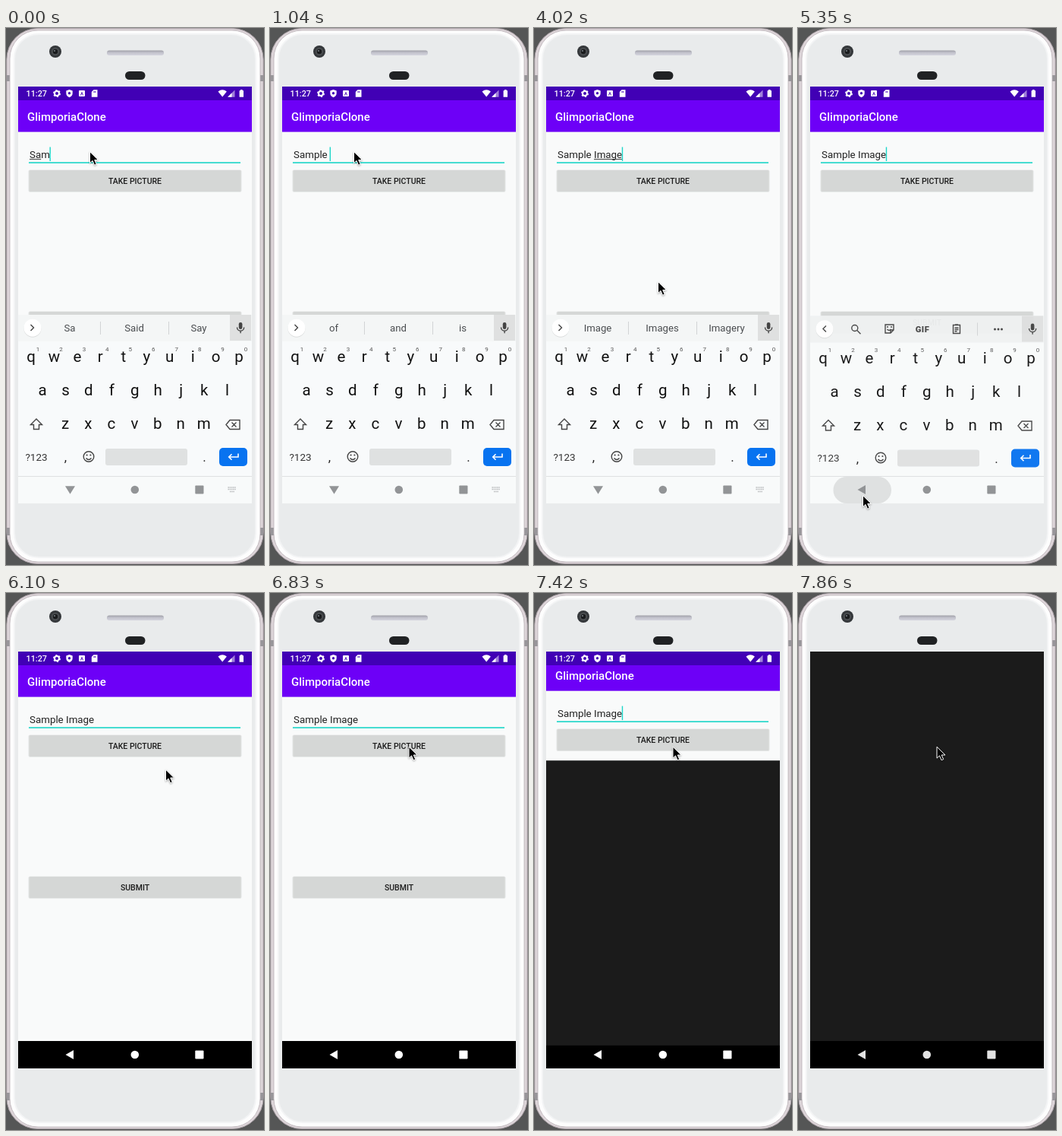
Animation, 340 px wide and 706 px high, one loop 8000 ms. Source, as an HTML page:

```html
<!DOCTYPE html>
<html lang="en">
<head>
<meta charset="utf-8">
<title>Phone demo</title>
<style>
html, body { margin: 0; width: 100%; height: 100%; overflow: hidden; background: #555656; }
svg { display: block; width: 340px; height: 706px; }
text { font-family: Roboto, "Noto Sans", sans-serif; white-space: pre; }
.mid { text-anchor: middle; }
.line { fill: none; stroke: #444; stroke-width: 1.4; }
#mouse { filter: drop-shadow(.8px 1px .8px #0005); }
</style>
</head>
<body>
<svg viewBox="0 0 340 706">
  <defs>
    <clipPath id="screenClip"><rect x="16" y="77" width="308" height="548"/></clipPath>
    <clipPath id="bodyClip"><rect x="16" y="77" width="308" height="512"/></clipPath>
    <clipPath id="revealClip"><rect id="reveal" x="16" y="589" width="308" height="600"/></clipPath>
    <linearGradient id="slot" x2="0" y2="1">
      <stop stop-color="#9d9da5"/><stop offset=".4" stop-color="#c0c0ca"/><stop offset="1" stop-color="#d5d5de"/>
    </linearGradient>
  </defs>

  <!-- phone body -->
  <rect x="240" y="0" width="9" height="3" fill="#333"/>
  <rect x=".8" y=".5" width="338.4" height="704" rx="41" fill="#ddd5d9" stroke="#a89fa4"/>
  <path d="M1 62h5v8H1zM334 62h5v8h-5zM1 657h5v10H1zM334 657h5v10h-5z" fill="#98969a"/>
  <rect x="5" y="3" width="330" height="699" rx="37" fill="#fdfdfd" stroke="#b9b0b5" stroke-width=".8"/>
  <rect x="11" y="8" width="318" height="688" rx="32" fill="#e9ebec" stroke="#f3f4f5" stroke-width="2"/>
  <circle cx="65" cy="31" r="8" fill="#34373a"/>
  <circle cx="65" cy="31" r="5.2" fill="#4b4e51"/>
  <circle cx="65" cy="31" r="3.2" fill="#191b1d"/>
  <circle cx="64" cy="30" r="1" fill="#798086"/>
  <rect x="133" y="29.5" width="75" height="6.5" rx="3" fill="url(#slot)"/>
  <rect x="157" y="57" width="26.5" height="11" rx="5.5" fill="#202224"/>

  <g clip-path="url(#screenClip)">
    <rect x="16" y="77" width="308" height="548" fill="#f9fafa"/>
    <g id="app">
      <rect x="16" y="95" width="308" height="41.6" fill="#6d00f7"/>
      <text x="28" y="122" font-size="15" font-weight="500" fill="#fff">GlimporiaClone</text>
      <rect x="30" y="176.3" width="279" height="1.6" fill="#1bd6c8"/>
      <text id="field" x="31" y="170.7" font-size="13.35" fill="#222"></text>
      <rect id="under" y="172" height="1" fill="#444"/>
      <rect id="caret" y="156.5" width="1.4" height="18.5" fill="#1bd6c8"/>
      <g id="buttons"></g>
    </g>
    <g clip-path="url(#bodyClip)"><g id="keyboard">
      <rect x="16" y="377" width="308" height="250" fill="#f8fafb"/>
      <rect id="strip" x="16" y="377" width="308" height="35"/>
      <rect x="295" y="377" width="28" height="34" fill="#dfe0e0"/>
      <rect x="306.8" y="387" width="4.6" height="9" rx="2.3" fill="#444"/>
      <path class="line" d="M304.5 393.5a4.6 4.6 0 0 0 9.2 0M309.1 398v3.2"/>
      <circle cx="35" cy="395.2" r="11.5" fill="#dcdede"/>
      <circle cx="35" cy="394.2" r="11.5" fill="#fff"/>
      <path id="chevron" class="line"/>
      <g id="words"><path d="M124.5 386v17M214.5 386v17" stroke="#d2d4d5"/></g>
      <g id="tools" transform="translate(0 -1)">
        <circle class="line" cx="74.8" cy="394" r="4"/><path class="line" d="M77.8 397l4.7 4.7"/>
        <path class="line" d="M115 389.5h11v7l-4 4h-7zM126 396.5h-4v4M117.5 395.5q2.5 3 5 0"/>
        <path d="M117 391.8h2v1.5h-2zM122 391.8h2v1.5h-2z" fill="#444"/>
        <text class="mid" x="164" y="399.3" font-size="11.2" font-weight="900" letter-spacing=".4" fill="#444">GIF</text>
        <path class="line" d="M204.5 390h9v11h-9zM207 389.5h4M206.5 393.8h5M206.5 396h5M206.5 398.2h3"/>
        <path d="M236.5 387v17" stroke="#d2d4d5"/>
        <path d="M259.5 395.5h9.1" fill="none" stroke="#444" stroke-width="3" stroke-linecap="round" stroke-dasharray="0 4.5"/>
      </g>
      <g id="keys"></g>
      <path class="line" d="M40 514l-7.5 7.5h4v6h7v-6h4z"/>
      <path class="line" d="M295 515.5h13v12h-13l-5-6zM297.5 518.5l6 6m0-6l-6 6"/>
      <circle class="line" cx="109" cy="563.5" r="6.8"/>
      <path class="line" d="M105.5 565.5q3.5 4 7 0"/>
      <circle cx="106.6" cy="561.5" r="1.1" fill="#444"/><circle cx="111.4" cy="561.5" r="1.1" fill="#444"/>
      <rect x="131" y="553" width="108" height="22" rx="3" fill="#dfe1e1"/>
      <rect x="281" y="552" width="37" height="24" rx="5" fill="#0873f0"/>
      <path d="M306 559.5v4.5h-12M297.5 560.3l-3.8 3.7 3.8 3.7" fill="none" stroke="#fff" stroke-width="1.6"/>
    </g></g>
    <rect id="navBg" x="16" y="589" width="308" height="36"/>
    <path id="navLine" d="M16 589.5h308" stroke="#dfe1e2"/>
    <rect id="ripple" x="46.5" y="590" width="76.5" height="35" rx="17.5" fill="#dfe1e1"/>
    <g clip-path="url(#revealClip)"><g id="camera">
      <rect x="16" y="77" width="308" height="548" fill="#1b1b1b"/>
      <rect x="16" y="589" width="308" height="60" fill="#000"/>
    </g></g>
    <g id="nav">
      <path id="back"/>
      <circle cx="169.8" cy="607" r="5.3"/>
      <rect x="249.3" y="601.4" width="11.2" height="11.2" rx="1"/>
    </g>
    <path id="switcher" d="M292.5 604h11M292.500 606.5h11M295 609.500h6" stroke="#b4b6b8" stroke-width="1.4" stroke-dasharray="1.400 .8"/>
    <g id="status">
      <rect x="16" y="77" width="308" height="18" fill="#4100b5"/>
      <g fill="#fff">
        <text x="26.5" y="90" font-size="10.8" font-weight="500">11:27</text>
        <circle cx="67" cy="86" r="3" fill="none" stroke="#fff" stroke-width="2"/>
        <circle cx="67" cy="86" r="4.3" fill="none" stroke="#fff" stroke-width="1.4" stroke-dasharray="2.2 2.3"/>
        <path d="M83.5 81l4.2 1.6v3.2q0 3.8-4.2 5.5q-4.2-1.7-4.2-5.5v-3.2z"/>
        <rect x="96" y="82" width="8" height="8" rx="1"/>
        <path d="M115.5 81.3h5v9.5h-7.7v-6.7z"/>
        <path d="M279.5 83.5q5.7-4.3 11.4 0l-5.7 7z"/>
        <path d="M301.5 81.5v9.3h-9.3z" opacity=".5"/><path d="M297.5 85.5v5.3h-5.3z"/>
        <path d="M309 81h2.6v1.2h1.4v8.6h-5.4v-8.6h1.4z"/>
      </g>
      <g fill="#4100b5"><circle cx="83.5" cy="85.8" r="1.7"/>
        <path d="M98 88.5l2-5 2 5h-1l-1-2.7-1 2.7zM115.5 83h.9v2h-.9zM117.2 83h.9v2h-.9z"/></g>
    </g>
  </g>
  <path id="mouse" d="M0-.8V14.2L3.5 10.9 6.1 16.8 8.7 15.6 6.2 10H11Z" fill="#000" stroke="#fff"/>
</svg>
<script>
const LOOP = 8000, STEP = 148.5;
const $ = id => document.getElementById(id);
const set = (el, attrs) => { for (const k in attrs) el.setAttribute(k, attrs[k]); return el; };
const show = (id, on) => set($(id), { visibility: on ? 'visible' : 'hidden' });

function add(parent, tag, attrs, text = '') {
  const el = set(document.createElementNS('http://www.w3.org/2000/svg', tag), attrs);
  el.textContent = text;
  parent.append(el);
  return el;
}
const label = (parent, x, y, size, fill, text, weight = 400) =>
  add(parent, 'text', { class: 'mid', x, y, 'font-size': size, fill, 'font-weight': weight }, text);

function button(y, text) {
  add($('buttons'), 'rect', { x: 29.5, y: y - .5, width: 281, height: 29.3, rx: 2, fill: '#e4e6e5' });
  const face = add($('buttons'), 'rect', { x: 30.5, y, width: 279, height: 28, rx: 1.5, fill: '#d5d7d6' });
  label($('buttons'), 170, y + 17.8, 10.5, '#1c1c1c', text, 500);
  return face;
}
const takeButton = button(187, 'TAKE PICTURE');
button(373, 'SUBMIT');

const keys = $('keys');
[['qwertyuiop', 33], ['asdfghjkl', 48], ['zxcvbnm', 78]].forEach(([row, x], r) => {
  [...row].forEach((c, i) => {
    label(keys, x + i * 30.45, 439 + r * 44, 20.5, '#111', c);
    if (!r) label(keys, x + 9 + i * 30.45, 424.5, 8, '#555', (i + 1) % 10);
  });
});
label(keys, 40, 568.5, 13.5, '#333', '?123');
label(keys, 78.5, 570, 17, '#222', ',');
label(keys, 261.5, 570, 17, '#222', '.');
const words = [84, 169, 254].map(x => label($('words'), x, 399, 13.2, '#4a4d50', ''));

// step, text, underline from, underline to, suggestions
const typing = [
  [0, 'Sam', 0, 2, 'Sa Said Say'],
  [1, 'Sam', 0, 3, 'Sam Same Sample'],
  [2, 'Samp', 0, 4, 'Samp Sample Samples'],
  [4, 'Sampl', 0, 5, 'Sample Samples Sampled'],
  [5, 'Sample', 0, 6, 'Sample Samples Sampled'],
  [7, 'Sample ', 0, 0, 'of and is'],
  [20, 'Sample I', 7, 8, 'I Is In'],
  [21, 'Sample Im', 7, 9, 'Im Image Imagine'],
  [22, 'Sample Ima', 7, 10, 'Image Imagine Images'],
  [23, 'Sample Imag', 7, 11, 'Image Imagine Images'],
  [24, 'Sample Image', 7, 12, 'Image Images Imagery'],
  [35, 'Sample Image', 0, 0, 'Image Images Imagery']
];
// steps at which the caret turns off, then on again
const blinks = [[10, 14], [17, 20], [31, 34], [38, 42], [45, 48]];
// step, x, y
const path = [
  [0, 110.5, 163.5], [24, 110.5, 163.5], [25, 120, 195], [26, 150, 295], [27, 163.5, 334.5],
  [28, 168, 400], [29, 152, 535], [30, 125, 632], [31, 108, 657], [33, 90, 625], [34, 85.5, 615.5],
  [36, 85.5, 615.5], [37, 98, 585], [38, 140, 470], [39, 182, 335], [40, 205, 255],
  [41, 210.5, 233], [42, 207, 226], [44, 188, 206], [45, 183, 203], [54, 183, 203]
];
const slide = [0, .72, .95];

function pointer(n) {
  const k = Math.max(1, path.findIndex(p => p[0] >= n));
  const [a, x, y] = path[k - 1], [b, u, v] = path[k];
  const f = (n - a) / (b - a);
  return [x + (u - x) * f, y + (v - y) * f];
}

function drawField(n) {
  const [, text, from, to, hints] = typing.filter(s => s[0] <= n).pop();
  const field = $('field');
  field.textContent = text;
  const width = len => len ? field.getSubStringLength(0, len) : 0;
  set($('under'), { x: 31 + width(from), width: width(to) - width(from) });
  set($('caret'), { x: 30.6 + width(text.length) });
  show('caret', !blinks.some(([off, on]) => n >= off && n < on));
  hints.split(' ').forEach((w, i) => { words[i].textContent = w; });
}

function drawKeyboard(n) {
  const tools = n >= 35, leaving = n >= 36, light = n < 37;
  $('keyboard').style.display = n < 38 ? '' : 'none';
  set($('keyboard'), {
    transform: `translate(0 ${n < 36 ? 0 : n < 37 ? 1.5 : 16})`,
    opacity: n < 36 ? 1 : n < 37 ? .96 : .4
  });
  set($('strip'), { fill: tools ? '#f0f2f2' : '#f4f6f6' });
  set($('chevron'), { d: tools ? 'M37 390l-4 4 4 4' : 'M32.5 390l4 4-4 4' });
  $('words').style.display = tools ? 'none' : '';
  $('tools').style.display = tools ? '' : 'none';
  set($('navBg'), { fill: light ? '#f8fafa' : '#000' });
  set($('nav'), { fill: light ? '#929496' : n < 53 ? '#fff' : '#e2e2e2' });
  set($('back'), { d: leaving ? 'M89 601v12l-10.5-6z' : 'M78 602.3h13l-6.5 10.5z' });
  show('navLine', light);
  show('ripple', n === 36);
  show('switcher', !leaving);
}

function drawCamera(n) {
  const p = n < 49 ? 0 : slide[n - 49] ?? 1;
  show('camera', n >= 49);
  show('status', n < 51);
  set($('reveal'), { y: 589 - 512 * p });
  set($('camera'), { transform: `translate(0 ${21 * (1 - p)})` });
  set($('app'), { transform: `translate(0 ${-11 * p})` });
  set(takeButton, { fill: n === 47 || n === 48 ? '#cbcdcc' : '#d5d7d6' });
}

let last = -1;
function frame(now) {
  const n = Math.min(53, Math.floor((now % LOOP + 10) / STEP));
  if (n !== last) {
    last = n;
    drawField(n);
    drawKeyboard(n);
    drawCamera(n);
    set($('mouse'), { transform: `translate(${pointer(n)})` });
  }
  requestAnimationFrame(frame);
}
frame(0);
</script>
</body>
</html>
```
